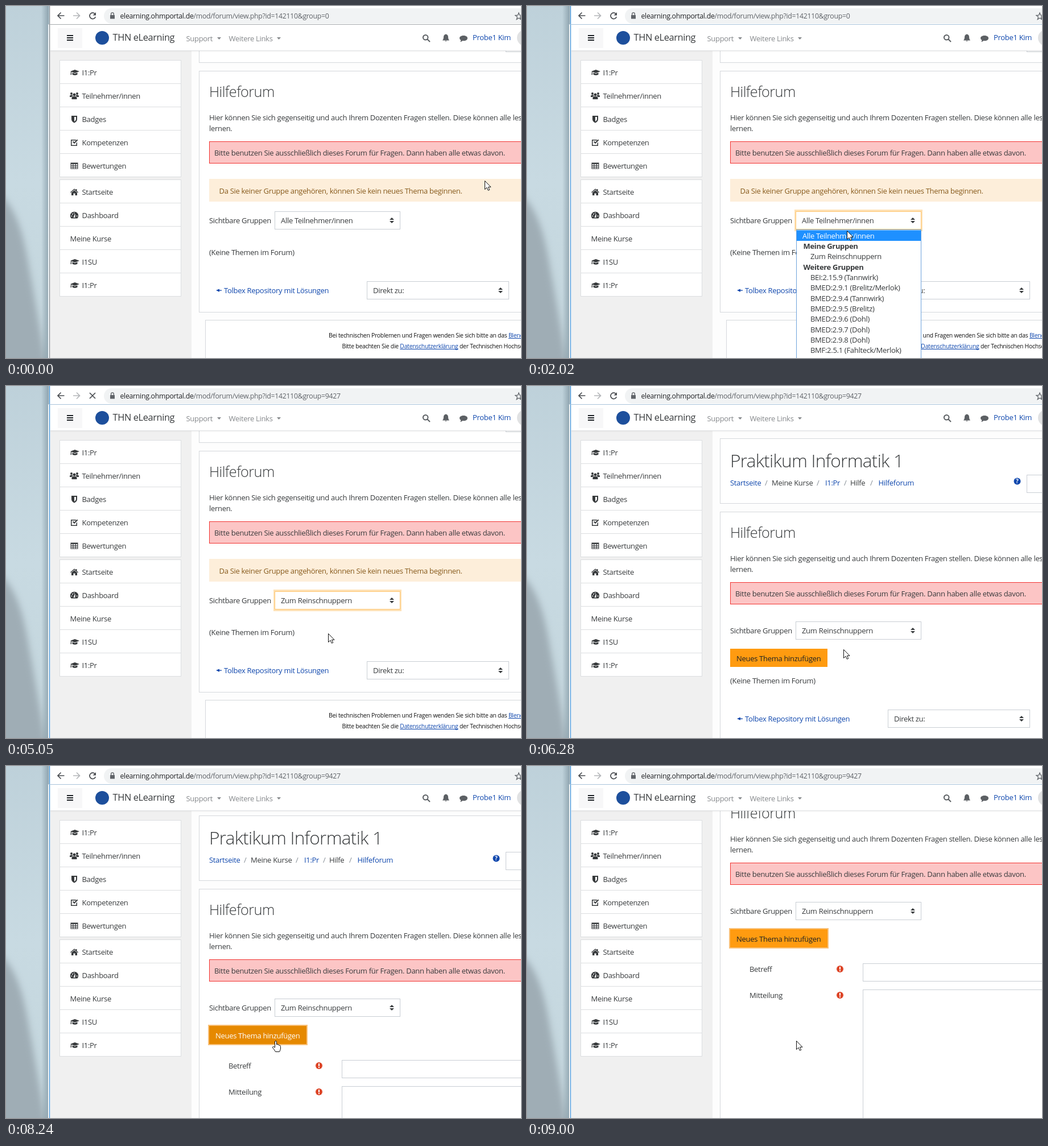
An HTML page with a canvas for the animation above (9.16 s loop, 905 px wide and 619 px high).

```html
<!DOCTYPE html>
<html lang="de">
<head>
<meta charset="utf-8">
<title>Hilfeforum</title>
<style>
  html, body { margin: 0; width: 100%; height: 100%; overflow: hidden; }
  canvas { display: block; }
</style>
</head>
<body>
<canvas id="stage" width="905" height="619"></canvas>
<script>
const ctx = document.getElementById('stage').getContext('2d');
const LOOP = 9160, W = 905, H = 619;
const INK = '#373a3c', LINK = '#0f47ad', LINE = '#d5d8dc', ORANGE = '#ff9b10', RED = '#dd4628';

const ICONS = {
  hat: 'M0 6 8 3 16 6 8 9ZM3.5 8.3 8 10 12.5 8.3V11.5Q8 14 3.5 11.5ZM1 6.5H2V12H.5Z',
  users: 'M5.5 6a2.5 2.5 0 1 1 5 0a2.5 2.5 0 1 1-5 0M1 4a2 2 0 1 1 4 0a2 2 0 1 1-4 0M11 4a2 2 0 1 1 4 0a2 2 0 1 1-4 0' +
    'M3.5 14V11Q4 9 6 9H10Q12 9 12.5 11V14ZM0 10V8Q.5 6.5 2 6.5H5L5 8.5 3 10ZM16 10V8Q15.5 6.5 14 6.5H11L11 8.5 13 10Z',
  shield: 'M3 2H13V8Q13 12 8 14.5Q3 12 3 8ZM8 4V12.3Q11 10.5 11 8V4Z',
  check: 'M2 3H11V4.5H3.5V12.5H11.5V9L13 7.5V14H2ZM5 7 6.3 5.8 8 7.6 13 2.6 14.3 4 8 10.3Z',
  table: 'M1.5 2.5H14.5V13.5H1.5ZM2.7 5H5.3V7H2.7ZM6.5 5H9.5V7H6.5ZM10.7 5H13.3V7H10.7ZM2.7 8H5.3V9.7H2.7ZM6.5 8H9.5V9.7H6.5Z' +
    'M10.7 8H13.3V9.7H10.7ZM2.7 10.8H5.3V12.5H2.7ZM6.5 10.8H9.5V12.5H6.5ZM10.7 10.8H13.3V12.5H10.7Z',
  home: 'M1 8.5 8 2.3 10.5 4.5V3H12.5V6.3L15 8.5 14.2 9.4 8 4 1.8 9.4ZM3 9.3 8 5 13 9.3V14H9.5V10.5H6.5V14H3Z',
  gauge: 'M2.5 13.5A7.2 7.2 0 1 1 13.5 13.5ZM6.5 12H9.5L9.7 6H8.7ZM2.5 8.5H4.2V10.200H2.5ZM4 5H5.7V6.7H4ZM7 3.3H8.500V4.800H7ZM11.8 8.5H13.5V10.2H11.8Z',
  bell: 'M8 1.5Q12.3 2.5 12 7Q12 10.5 14 12.5H2Q4 10.5 4 7Q3.7 2.5 8 1.5ZM6.5 13H9.5Q8 15.5 6.5 13Z',
  chat: 'M1 7.5C1 1.5 15 1.5 15 7.5C15 11.5 10 13 6.5 12Q4.5 14 2 14Q3.5 12.5 3.3 11Q1 9.5 1 7.5Z',
  lock: 'M4 7H5V5Q5 2 8 2T11 5V7H12V13.5H4ZM6.3 7H9.7V5Q9.7 3.3 8 3.3T6.3 5Z',
};
const ARROW = new Path2D('M.5.5V15.5L4 12.2 6.3 17.3 8.7 16.3 6.5 11.3H11Z');
const HAND = new Path2D('M5.5 12V2Q5.5.5 7 .5T8.5 2V7Q8.7 6 10 6.2T11.2 7.5Q13 6.5 13.5 8.5' +
  'Q15.5 8 15.5 10.5V14Q15 17 13.5 19.5H6.5Q5 16 1.5 12.5Q1 10.5 3 10.5Z');

const MENU = [
  [117, 'hat', 'I1:Pr'], [158, 'users', 'Teilnehmer/innen'], [199, 'shield', 'Badges'],
  [240, 'check', 'Kompetenzen'], [281, 'table', 'Bewertungen'], [327, 'home', 'Startseite'],
  [368, 'gauge', 'Dashboard'], [409, '', 'Meine Kurse'], [450, 'hat', 'I1SU'], [491, 'hat', 'I1:Pr'],
];
const GROUPS = ['Alle Teilnehmer/innen', 'Meine Gruppen', 'Zum Reinschnuppern', 'Weitere Gruppen',
  'BEI:2.15.9 (Tannwirk)', 'BMED:2.9.1 (Brelitz/Merlok)', 'BMED:2.9.4 (Tannwirk)', 'BMED:2.9.5 (Brelitz)',
  'BMED:2.9.6 (Dohl)', 'BMED:2.9.7 (Dohl)', 'BMED:2.9.8 (Dohl)', 'BMF:2.5.1 (Fahlteck/Merlok)'];

// Progress 0..1 in n equal jumps, the first at `from`, the last at `to`
function stepped(t, from, to, n) {
  if (t < from) return 0;
  return Math.min(1, (Math.floor((t - from) / (to - from) * (n - 1) + .1) + 1) / n);
}
const mix = (a, b, p) => a + (b - a) * p;
const curve = (a, c, b, p) => mix(mix(a, c, p), mix(c, b, p), p);

function fill(x, y, w, h, color) {
  ctx.fillStyle = color;
  ctx.fillRect(x, y, w, h);
}
function box(x, y, w, h, color, border) {
  fill(x, y, w, h, color);
  ctx.strokeStyle = border;
  ctx.lineWidth = 1;
  ctx.strokeRect(x + .5, y + .5, w - 1, h - 1);
}
// Text centred on its capital height; returns the end x
function text(str, x, y, color = INK, size = 13, weight = 400) {
  ctx.font = `${weight} ${size}px "Open Sans", "Noto Sans", sans-serif`;
  ctx.letterSpacing = `${-.0235 * size}px`;
  ctx.fillStyle = color;
  ctx.fillText(str, x, Math.round(y + size * .357));
  return x + ctx.measureText(str).width;
}
function underlined(str, x, y, size) {
  const end = text(str, x, y, LINK, size);
  fill(x, Math.round(y + 5), end - x, 1, LINK);
  return end;
}
function disc(x, y, r, color) {
  ctx.fillStyle = color;
  ctx.beginPath();
  ctx.arc(x, y, r, 0, 7);
  ctx.fill();
}
function path(d, x, y, color, stroke) {
  ctx.save();
  ctx.translate(x, y);
  const shape = typeof d === 'string' ? new Path2D(d) : d;
  if (color) { ctx.fillStyle = color; ctx.fill(shape, 'evenodd'); }
  if (stroke) { ctx.strokeStyle = stroke; ctx.stroke(shape); }
  ctx.restore();
}
const icon = (name, x, y, color = INK) => path(ICONS[name], x - 8, y - 8, color);
function faded(alpha, draw) {
  ctx.save();
  ctx.globalAlpha = alpha;
  draw();
  ctx.restore();
}

function desktop() {
  const sky = ctx.createLinearGradient(0, 0, 0, H);
  sky.addColorStop(0, '#bed1da');
  sky.addColorStop(.5, '#c8dae2');
  sky.addColorStop(1, '#c3d5dc');
  fill(0, 0, 78, H, sky);
  ctx.save();
  ctx.filter = 'blur(6px)';
  path('M-20 325Q20 347 37 440T72 640H-20Z', 0, 0, '#9fadb5');
  ctx.restore();
  const shade = ctx.createLinearGradient(62, 0, 75, 0);
  shade.addColorStop(0, 'rgba(70,95,110,0)');
  shade.addColorStop(1, 'rgba(70,95,110,.4)');
  fill(62, 0, 13, H, shade);
}

function browserBar(t) {
  fill(77, 0, W, 32, '#fff');
  ctx.lineWidth = 1.7;
  path('M12.5 6H1M6.5 .5 1 6 6.5 11.5', 90, 11, null, '#4a4d51');
  path('M0 6H11.5M6 .5 11.5 6 6 11.5', 118, 11, null, '#b4b6b9');
  if (t >= 4560 && t < 5270) path('M1 1 11 11M11 1 1 11', 146, 11, null, '#4a4d51');
  else {
    path('M10.5 2.5A5.3 5.3 0 1 0 11.3 7.5', 146, 11.5, null, '#4a4d51');
    path('M12 0V5.5H6.5Z', 146, 11, '#4a4d51');
  }
  ctx.fillStyle = '#f1f3f4';
  ctx.beginPath();
  ctx.roundRect(172, 4, 800, 27, 13.5);
  ctx.fill();
  icon('lock', 187, 17, '#5f6368');
  const end = text('elearning.ohmportal.de', 200.5, 18, '#202124', 12.3);
  text('/mod/forum/view.php?id=142110&group=' + (t < 5050 ? '0' : '9427'), end, 18, '#5f6368', 12.3);
  ctx.lineWidth = 1.3;
  path('M6 0 7.6 4.2 12 4.5 8.5 7.3 9.7 11.6 6 9.2 2.3 11.6 3.5 7.3 0 4.5 4.4 4.2Z', 895, 12, null, '#5f6368');
}

function navBar() {
  fill(78, 33, W, 45, '#fff');
  fill(78, 78, W, 1, '#dfe1e3');
  fill(78, 79, W, 2, 'rgba(0,0,0,.03)');
  fill(91, 39, 43, 35, '#f7f7f8');
  for (const y of [51, 55, 59]) fill(107, y, 11, 2, '#1d2125');
  disc(169, 56, 12, '#1d4f9c');
  text('THN eLearning', 187.5, 55, INK, 16.4);
  text('Support', 316.5, 57, '#86898c');
  text('Weitere Links', 391.5, 57, '#86898c');
  for (const x of [371, 476]) path('M0 0H7L3.5 4Z', x, 55, '#86898c');
  ctx.lineWidth = 2;
  path('M9.5 5.3a4.3 4.3 0 1 1-8.6 0a4.3 4.3 0 1 1 8.6 0M8.5 8.5 13 13', 732, 50, null, '#5c6064');
  icon('bell', 773, 56, '#5c6064');
  icon('chat', 804, 57, '#5c6064');
  text('Probe1 Kim', 820, 55, LINK);
  disc(912, 56, 14, '#e1e2e3');
}

function sideBar() {
  fill(78, 79, 248, H, '#f0f0f0');
  for (const [y, name, label] of MENU) {
    box(94, y - 22, 214, 42, '#fff', '#dcdee0');
    if (name) icon(name, name === 'hat' ? 121 : 120, y);
    text(label, name ? 133.5 : 112.5, y);
  }
}

function select(x, y, w, label) {
  box(x, y, w, 32, '#fff', '#c9ced4');
  text(label, x + 11, y + 16.5);
  path('M0 4 4 0 8 4ZM0 6H8L4 10Z', x + w - 19, y + 11, INK);
}

function button(hover, focused) {
  if (focused) fill(355, 460, 175, 36, '#f9c27c');
  fill(357, 462, 171, 32, ORANGE);
  text('Neues Thema hinzufügen', 368, 479, '#1d2125');
  faded(hover, () => {
    fill(357, 462, 171, 32, '#e68900');
    text('Neues Thema hinzufügen', 368, 479, '#fff');
  });
}

function form(height) {
  ctx.save();
  ctx.beginPath();
  ctx.rect(340, 505, W, height);
  ctx.clip();
  for (const [label, y, h] of [['Betreff', 532, 32], ['Mitteilung', 578, 400]]) {
    text(label, 391, y);
    disc(550, y, 6, RED);
    fill(549, y - 4, 2, 5, '#fff');
    fill(549, y + 2, 2, 2, '#fff');
    box(590, y - 10, 400, h, '#fff', '#c9ced4');
  }
  ctx.restore();
}

function content(t) {
  const before = t < 5200;
  const opened = stepped(t, 7150, 7380, 4);
  const hover = stepped(t, 6430, 6510, 2) - stepped(t, 8850, 9000, 3);
  const glow = before ? stepped(t, 690, 920, 4) : 0;
  const scrolled = 175 * Math.sin(stepped(t, 8240, 8540, 5) * Math.PI / 2) ** 2.95;
  const selectY = before ? 468 : 414;
  const formHeight = opened * 700;
  const end = (before ? 540 : 518) + formHeight;

  ctx.save();
  ctx.beginPath();
  ctx.rect(326, 78, W, H);
  ctx.clip();
  fill(326, 78, W, H, '#fdfdfd');
  ctx.translate(0, -(before ? 107 : Math.round(scrolled)));

  box(339, 92, 700, 115, '#fff', LINE);
  text('Praktikum Informatik 1', 357, 132, INK, 31.6, 300);
  const crumbs = [['Startseite', 357, LINK], ['/', 418, '#868e96'], ['Meine Kurse', 430, INK], ['/', 509, '#868e96'],
    ['I1:Pr', 524, LINK], ['/', 557, '#868e96'], ['Hilfe', 568, INK], ['/', 603, '#868e96'], ['Hilfeforum', 617.5, LINK]];
  for (const [label, x, color] of crumbs) text(label, x, 170, color);
  disc(861.5, 167.5, 6, LINK);
  text('?', 859, 167.5, '#fff', 10, 700);
  box(878, 156, 100, 32, '#fff', '#c9ced4');

  box(339, 221, 700, end + 106 - 221, '#fff', LINE);
  text('Hilfeforum', 357, 257.5, INK, 25.3, 300);
  text('Hier können Sie sich gegenseitig und auch Ihrem Dozenten Fragen stellen. Diese können alle lesen und daraus', 357, 303);
  text('lernen.', 357, 322);
  box(357, 345, 700, 39, '#fcc5c5', '#f23331');
  text('Bitte benutzen Sie ausschließlich dieses Forum für Fragen. Dann haben alle etwas davon.', 366, 365);
  if (before) {
    fill(357, 411, 700, 40, '#fdeeda');
    text('Da Sie keiner Gruppe angehören, können Sie kein neues Thema beginnen.', 374.5, 432, '#875a1c');
  }

  text('Sichtbare Gruppen', 357, selectY + 16.5);
  faded(glow, () => fill(470, selectY - 3, 225, 38, '#fee1b5'));
  select(472, selectY, 221, t < 4560 ? GROUPS[0] : GROUPS[2]);
  faded(glow, () => {
    ctx.strokeStyle = '#ffc670';
    ctx.strokeRect(472.5, selectY + .5, 220, 31);
  });
  if (!before) button(hover, t >= 7150);
  if (opened) form(formHeight);

  text('(Keine Themen im Forum)', 357, end);
  path('M0 2.5 6 0V2H10V3.3H6V5.2Z', 369, end + 64.5, LINK);
  text('Tolbex Repository mit Lösungen', 383, end + 67.5, LINK);
  select(634, end + 51, 250, 'Direkt zu:');
  box(350, end + 119, 700, 200, '#fff', LINE);
  const help = text('Bei technischen Problemen und Fragen wenden Sie sich bitte an das ', 567, end + 146, '#111', 10.4);
  underlined('Blended Learning', help, end + 146, 10.4);
  const note = text('Bitte beachten Sie die ', 590.5, end + 165, '#111', 10.4);
  const rest = underlined('Datenschutzerklärung', note, end + 165, 10.4);
  text(' der Technischen Hochschule', rest, end + 165, '#111', 10.4);
  ctx.restore();
}

function dropdown(t, pointerY) {
  if (t < 770 || t >= 4560) return;
  const active = t >= 2400 || pointerY > 431 ? 2 : 0;
  box(473, 393, 220, 300, '#fff', '#6fa3dc');
  fill(474, 394.5 + active * 18.33, 218, 18.5, '#1e90ff');
  GROUPS.forEach((label, i) => {
    const heading = i === 1 || i === 3;
    const x = i === 0 ? 484 : heading ? 485.5 : 498;
    text(label, x, 404 + i * 18.33, i === active ? '#fff' : INK, 13, heading ? 700 : 400);
  });
}

function windowFrame(active) {
  fill(74, 32, 2, H, '#f1f6f9');
  fill(76, 0, 1, H, active ? '#3a8fd8' : '#858b90');
  fill(77, 0, 1, H, active ? '#d3e6f6' : '#dddfe1');
  fill(75, 32, W, 1, active ? '#a9c4da' : '#a6aaad');
}

function pointer(t) {
  if (t < 690) {
    const p = stepped(t, 80, 540, 7), e = p * p * (3 - 2 * p);
    return [curve(841, 690, 541, e), curve(307, 238, 375, e)];
  }
  if (t < 2020) {
    const p = stepped(t, 690, 920, 4);
    return [mix(541, 560, p), mix(375, 377, p)];
  }
  if (t < 3260) {
    const p = stepped(t, 2020, 2400, 6), e = p * (2 - p);
    return [mix(560, 566, e), mix(377, 437, e)];
  }
  if (t < 3560) {
    const p = stepped(t, 3260, 3410, 3);
    return [mix(566, 542, p), mix(437, 421, p)];
  }
  if (t < 6280) {
    const p = stepped(t, 3560, 4330, 11);
    return [553.5 - 12.5 * Math.cos(5 * Math.PI * p), 421 + 14 * p ** 5];
  }
  const p = stepped(t, 6280, 6510, 4);
  const lift = 4 * stepped(t, 6910, 6980, 2);
  return [curve(566, 555, 473, p), curve(435, 501, 487, p) - lift];
}

function frame() {
  const t = performance.now() % LOOP;
  const [x, y] = pointer(t).map(Math.round);
  desktop();
  content(t);
  sideBar();
  navBar();
  browserBar(t);
  windowFrame(t >= 690);
  dropdown(t, y);
  ctx.lineWidth = 1;
  if (t >= 6430 && t < 8850) path(HAND, x - 6, y, '#fff', '#111');
  else path(ARROW, x, y, '#fff', '#111');
  requestAnimationFrame(frame);
}
frame();
</script>
</body>
</html>
```
